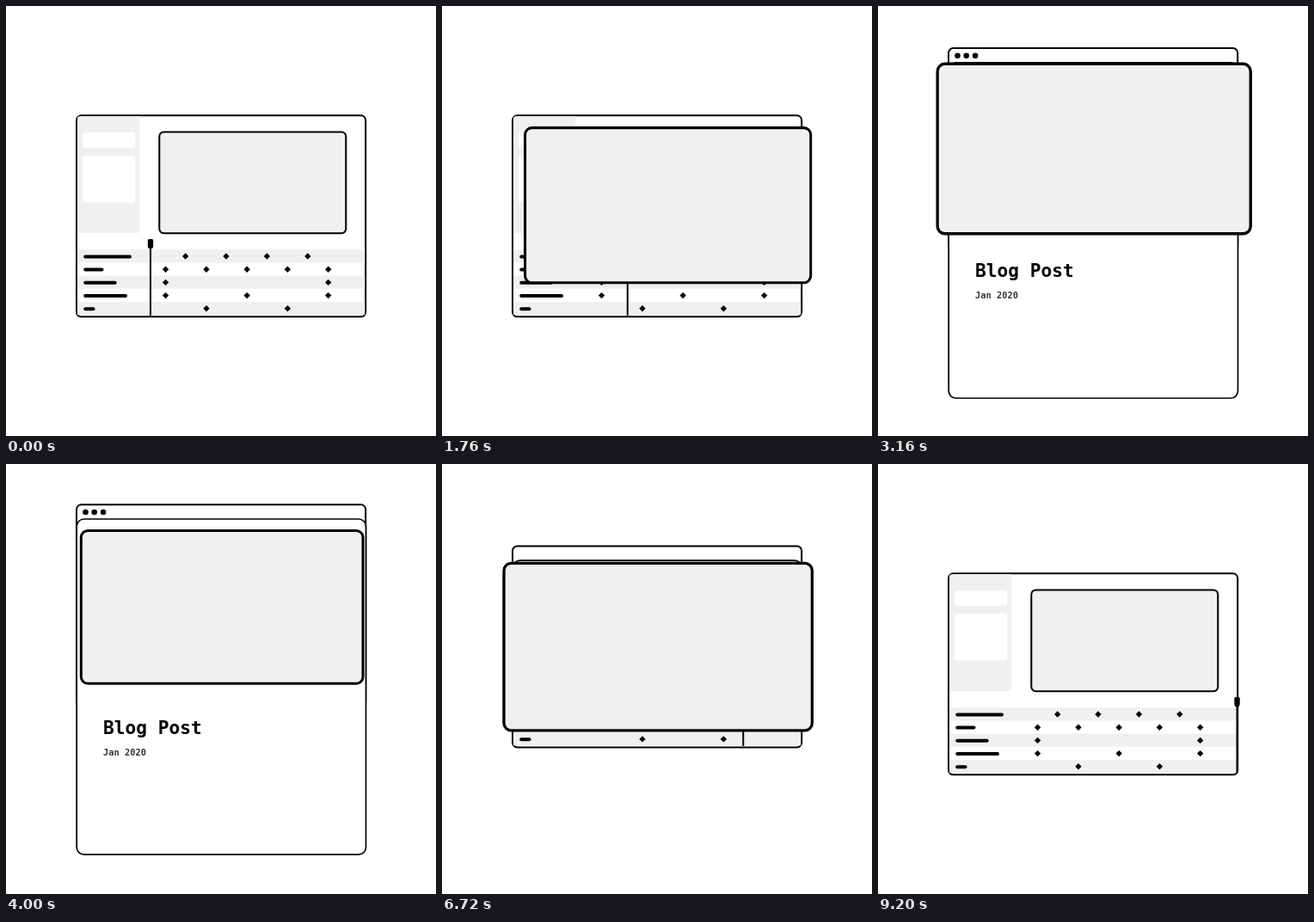
An HTML page that plays this animation: 500x500 px, repeating every 9240 ms.

```html
<!DOCTYPE html>
<html lang="en">
<head>
<meta charset="utf-8">
<title>Editor to blog post</title>
<style>
  html, body { margin: 0; width: 100%; height: 100%; overflow: hidden; background: #fff; }
  svg { display: block; width: 100vw; height: 100vh; }
  .line { fill: #fff; stroke: #000; stroke-width: 2; }
  .gray { fill: #f0f0f0; }
  .white { fill: #fff; }
  text { font-family: "DejaVu Sans Mono", monospace; font-weight: bold; }
</style>
</head>
<body>
<svg viewBox="0 0 500 500">
  <g id="app">
    <rect class="line" x="82" y="127.3" width="336.2" height="234" rx="5.5"/>
    <g id="side">
      <path class="gray" d="M83 264V131q0-2.7 2.7-2.7H155V261q0 3-3 3z"/>
      <rect class="white" x="89" y="147.3" width="61.3" height="17.7" rx="3"/>
      <rect class="white" x="89" y="174" width="61.3" height="54.5" rx="3"/>
    </g>
    <g id="rows"></g>
    <g id="head">
      <path d="M-3.2 272.7q0-1.7 1.7-1.7h3q1.7 0 1.7 1.7v6q0 3.7-3.2 3.7t-3.2-3.7z"/>
      <path d="M0 280V359.8" stroke="#000" stroke-width="2"/>
    </g>
    <g id="page">
      <rect id="sheet" class="line" x="82.2" y="144" width="336.3" rx="8.5" style="stroke-width:1.7"/>
      <g id="copy">
        <text x="113" y="393.6" font-size="21.2">Blog Post</text>
        <text x="113" y="418.6" font-size="10.4" fill="#333">Jan 2020</text>
      </g>
    </g>
    <g id="dots">
      <circle cx="92.5" cy="136" r="3.3"/>
      <circle cx="102.7" cy="136" r="3.3"/>
      <circle cx="113.1" cy="136" r="3.3"/>
    </g>
  </g>
  <g id="box">
    <rect class="line" x="-108.5" y="-58.85" width="217" height="117.7" rx="5.2" style="fill:#f0f0f0"/>
  </g>
</svg>
<script>
const LOOP = 9240;
const $ = id => document.getElementById(id);

// Timeline rows: label end and keyframe positions
const rows = [
  [144, [208.7, 256, 303.4, 350.8]],
  [111.5, [185.6, 233, 280.2, 327.4, 374.7]],
  [126.7, [185.6, 374.7]],
  [139, [185.6, 280.2, 374.7]],
  [101.5, [233, 327.4]]
];
$('rows').innerHTML = rows.map(([end, keys], i) => {
  const y = 291 + i * 15.2;
  const band = i % 2 ? '' :
    `<rect class="gray" x="83" y="${y - 7.8}" width="334.2" height="15.2"/>`;
  const label = `<path d="M92.2 ${y + .4}H${end}" stroke="#000" stroke-width="4" stroke-linecap="round"/>`;
  const marks = keys.map(x => `<path d="M${x} ${y - 3.7}l3.7 3.7l-3.7 3.7l-3.7-3.7z"/>`).join('');
  return band + label + marks;
}).join('');

const mix = (a, b, p) => a + (b - a) * p;
const span = (t, a, b) => Math.min(1, Math.max(0, (t - a) / (b - a)));
const cubic = u => u < .5 ? 4 * u ** 3 : 1 - 4 * (1 - u) ** 3;
const expo = u => u <= 0 ? 0 : u >= 1 ? 1
  : u < .5 ? 2 ** (20 * u - 11) : 1 - 2 ** (9 - 20 * u);

// Goes 0 to 1 over [a, b] and back to 0 over [c, d]
const there = (t, a, b, c, d, ease = cubic) =>
  ease(span(t, a, b)) - cubic(span(t, c, d));

function draw(t) {
  const move = there(t, 683, 2580, 7278, 8243);
  const grow = there(t, 536, 2726, 7200, 8080, expo);
  const fit = there(t, 2702, 5322, 6020, 6980, expo);
  const lift = there(t, 1937, 3427, 6040, 7310);
  const open = there(t, 2161, 3169, 6040, 6900);
  const copy = there(t, 2650, 3250, 6080, 6480);
  const dots = there(t, 2560, 3000, 6300, 6700);
  const side = there(t, 1960, 2260, 6900, 7200);

  $('app').setAttribute('transform', `translate(0 ${-80 * lift})`);
  $('head').setAttribute('transform', `translate(${168 + t * .02712} 0)`);
  $('side').setAttribute('opacity', 1 - side);
  $('dots').setAttribute('opacity', dots);
  $('page').setAttribute('visibility', t > 2180 && t < 6960 ? 'visible' : 'hidden');
  $('sheet').setAttribute('height', mix(170, 390.2, open));
  $('copy').setAttribute('opacity', copy);

  const x = mix(286.8, 251.2, move);
  const y = mix(205.4, 244.2, move) - 80 * lift + 4.6 * fit;
  const s = 1 + .68 * grow - .36 * fit;
  $('box').setAttribute('transform', `translate(${x} ${y}) scale(${s})`);
}

const start = performance.now();
function tick() {
  draw((performance.now() - start) % LOOP);
  requestAnimationFrame(tick);
}
tick();
</script>
</body>
</html>
```
